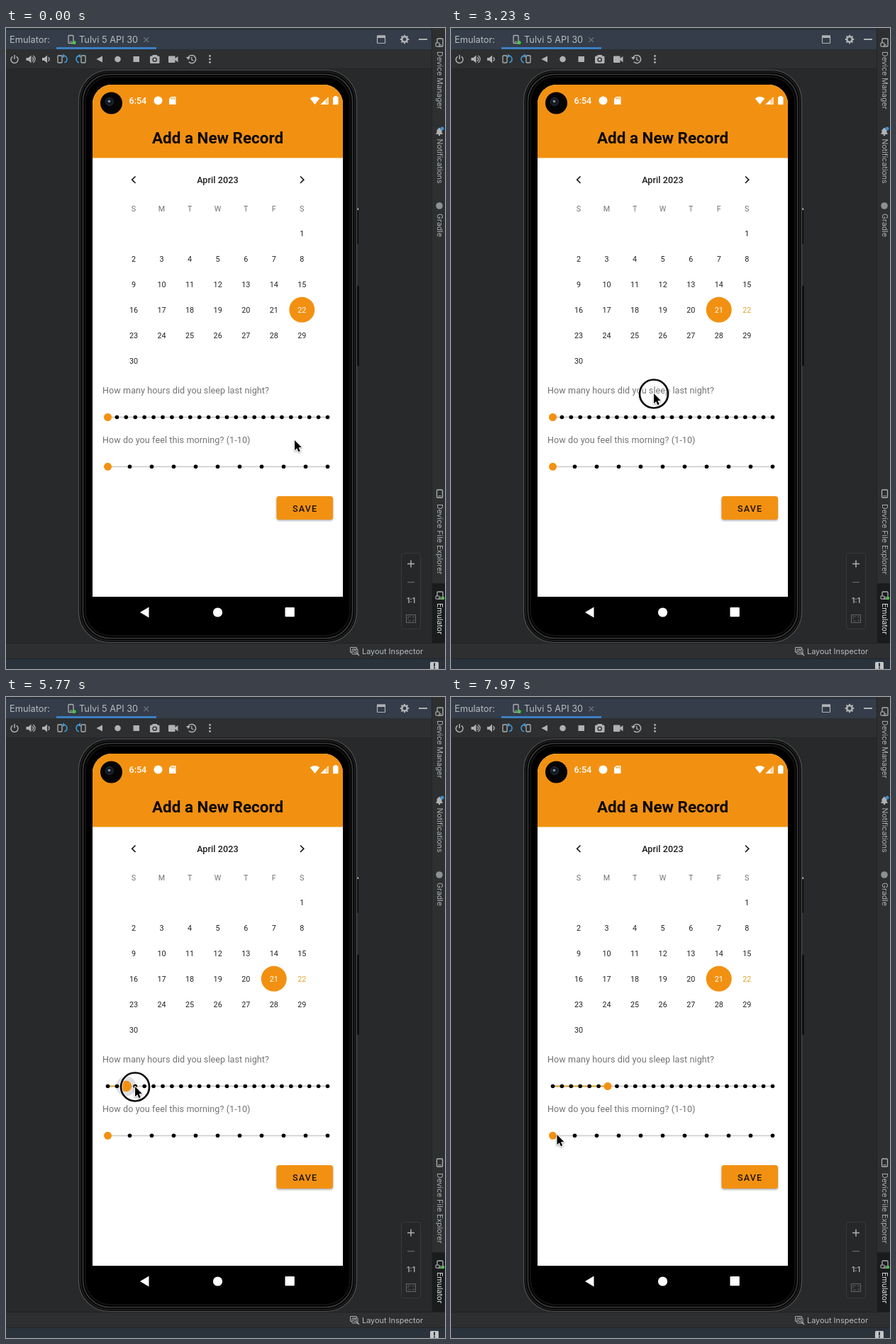
Recreate the animation shown at these times as an HTML page with a canvas. Size 619 by 905 pixels, loop 8000 ms.

```html
<!DOCTYPE html>
<html lang="en">
<head>
<meta charset="utf-8">
<title>Sleep record form</title>
<style>
html, body { margin: 0; width: 100%; height: 100%; overflow: hidden; background: #27292b; }
canvas { display: block; }
</style>
</head>
<body>
<canvas id="stage" width="619" height="905"></canvas>
<script>
const W = 619, H = 905, LOOP = 8000;
const ORANGE = '#f29111', GOLD = '#dba52e', ICON = '#afb1b3';
const UI = 'Inter, "Open Sans", sans-serif', APP = 'Roboto, "Noto Sans", sans-serif';
const screen = document.getElementById('stage').getContext('2d');
let c = screen;

// ---- drawing helpers
function rect(x, y, w, h, fill) { c.fillStyle = fill; c.fillRect(x, y, w, h); }
function round(x, y, w, h, r, fill, stroke, lw = 1) {
  c.beginPath();
  c.roundRect(x, y, w, h, r);
  if (fill) { c.fillStyle = fill; c.fill(); }
  if (stroke) { c.strokeStyle = stroke; c.lineWidth = lw; c.stroke(); }
}
function disc(x, y, r, fill) {
  c.beginPath();
  c.arc(x, y, r, 0, 7);
  c.fillStyle = fill;
  c.fill();
}
function arc(x, y, r, a, b, color, lw = 1.4) {
  c.beginPath();
  c.arc(x, y, r, a, b);
  c.strokeStyle = color;
  c.lineWidth = lw;
  c.stroke();
}
function trace(pts) {
  c.beginPath();
  for (let i = 0; i < pts.length; i += 2) c.lineTo(pts[i], pts[i + 1]);
}
function line(pts, color, lw = 1.4) {
  trace(pts);
  c.strokeStyle = color;
  c.lineWidth = lw;
  c.stroke();
}
function poly(pts, fill) {
  trace(pts);
  c.closePath();
  c.fillStyle = fill;
  c.fill();
}
function text(str, x, y, font, color, align = 'left', spacing = 0) {
  c.font = font;
  c.fillStyle = color;
  c.textAlign = align;
  c.letterSpacing = spacing + 'px';
  c.fillText(str, x, y);
  c.letterSpacing = '0px';
}

// ---- IDE window
function sideLabel(str, y, color = ICON) {
  c.save();
  c.translate(607.5, y);
  c.rotate(Math.PI / 2);
  text(str, 0, 0, '10.6px ' + UI, color);
  c.restore();
}
function deviceIcon(x, y, w, h, dot) {
  round(x, y, w, h, 1, null, ICON, 1.3);
  line([x + 2, y + h - 2.3, x + w - 2, y + h - 2.3], ICON, 1);
  if (dot) disc(x + w + 1, y + h - 1, 2.6, dot);
}
function speaker(x, loud) {
  poly([x - 6, 42, x - 3, 42, x + 1, 38.5, x + 1, 49.5, x - 3, 46, x - 6, 46], ICON);
  arc(x + 1, 44, 3, -1.1, 1.1, ICON, 1.3);
  if (loud) arc(x + 1, 44, 5.6, -1.1, 1.1, ICON, 1.3);
}
function toolbar() {
  arc(12, 44.5, 5, -1, 4.14, ICON, 1.5);
  line([12, 38, 12, 44], ICON, 1.5);
  speaker(34.5, true);
  speaker(57, false);
  round(73, 39, 6, 10, 1, null, ICON, 1.3);
  arc(81, 44, 5, -1.4, 1.3, '#3f9ad6', 1.6);
  poly([80, 36.5, 84, 39.5, 80, 42], '#3f9ad6');
  round(106, 39, 6, 10, 1, null, ICON, 1.3);
  arc(104, 44, 5, 1.8, 4.5, '#3f9ad6', 1.6);
  poly([105, 36.5, 101, 39.5, 105, 42], '#3f9ad6');
  poly([127.5, 44, 136, 39.5, 136, 48.5], ICON);
  disc(157.5, 44, 4.3, ICON);
  rect(179.5, 40, 8.5, 8, ICON);
  round(203, 39.5, 13.5, 10.5, 1.5, ICON);
  rect(206.5, 38, 6.5, 3, ICON);
  arc(209.7, 44.7, 2.6, 0, 7, '#2d2f31', 1.4);
  round(229, 39.5, 9.5, 9.5, 1, ICON);
  poly([237, 44, 242.5, 40, 242.5, 48.5], ICON);
  arc(262, 44, 5.6, -2.8, 2.4, ICON, 1.5);
  poly([254, 41, 260, 41, 257, 45], ICON);
  line([261.8, 41, 261.8, 44.8, 264.6, 46], ICON, 1.3);
  for (const y of [39.5, 44, 48.5]) disc(287.5, y, 1.4, ICON);
}
function sidebar() {
  rect(601, 0, 18, 869, '#2d2f31');
  rect(600, 0, 1, 869, '#222426');
  rect(601, 784, 18, 84, '#191b1c');
  deviceIcon(608, 15, 8, 11);
  round(606, 21, 5, 5, 0.5, '#2d2f31', ICON, 1.1);
  sideLabel('Device Manager', 33);
  poly([606, 150, 607.5, 147.5, 607.5, 144, 611, 140.5, 614.5, 144, 614.5, 147.5, 616, 150], ICON);
  disc(611, 151, 1.3, ICON);
  disc(615, 142, 2.5, '#3e8fd0');
  sideLabel('Notifications', 156.5);
  disc(611, 251, 4.8, '#8d9194');
  sideLabel('Gradle', 262);
  deviceIcon(607.5, 652, 8, 11);
  sideLabel('Device File Explorer', 672);
  deviceIcon(608, 796, 8, 10);
  round(606, 802, 5, 4, 0.5, '#191b1c', ICON, 1.1);
  disc(616, 805, 2.3, '#4fc14a');
  sideLabel('Emulator', 812, '#e2e4e5');
}
function zoomPanel() {
  round(557.5, 741.5, 27, 107, 4, '#252729', '#383a3c');
  line([566, 756.5, 576, 756.5], ICON, 1.5);
  line([571, 751.5, 571, 761.5], ICON, 1.5);
  line([566, 782.5, 576, 782.5], '#626466', 1.3);
  text('1:1', 571, 812, '600 10.5px ' + UI, ICON, 'center');
  c.setLineDash([4, 2]);
  round(567, 831, 8, 6, 0, null, '#55585a');
  c.setLineDash([]);
  round(564.5, 828.5, 13, 11, 0, null, '#626466', 1.1);
}
function ide() {
  rect(0, 0, W, H, '#27292b');
  rect(0, 0, 601, 31, '#343d49');
  rect(0, 0, 601, 3, '#2c333d');
  rect(0, 30, 601, 28, '#2d2f31');
  rect(0, 57, 601, 1, '#232527');
  text('Emulator:', 5, 21, '12.8px ' + UI, '#b9bcbf');
  deviceIcon(88, 10.5, 7, 11, '#4fc14a');
  text('Tulvi 5 API 30', 103, 21, '12.8px ' + UI, '#b9bcbf');
  line([194.5, 13.5, 201, 20], '#69717b', 1.2);
  line([201, 13.5, 194.5, 20], '#69717b', 1.2);
  rect(71, 27, 141, 3, '#3c7fc4');
  round(523.5, 11, 11, 10.5, 0.5, null, ICON, 1.2);
  rect(523, 10.5, 12, 3.5, ICON);
  arc(562, 16, 3.7, 0, 7, ICON, 2.6);
  for (let i = 0; i < 8; i++) {
    const a = i * Math.PI / 4, x = Math.cos(a), y = Math.sin(a);
    line([562 + x * 4, 16 + y * 4, 562 + x * 6.3, 16 + y * 6.3], ICON, 2);
  }
  rect(582, 15, 12, 2, ICON);
  toolbar();
  zoomPanel();
  sidebar();
  rect(0, 869, W, 36, '#2d2f31');
  rect(0, 868, W, 1, '#202224');
  rect(0, 891, W, 14, '#2a323c');
  rect(0, 890, W, 1, '#222426');
  round(485.5, 874.5, 9, 7, 0.5, null, ICON, 1);
  round(488, 877, 8, 7, 0.5, '#2d2f31', ICON, 1);
  arc(492, 880, 2, 0, 7, ICON, 1);
  line([494, 882, 498, 886], ICON, 1.3);
  text('Layout Inspector', 502, 884, '10.9px ' + UI, '#b9bcbf');
  round(598, 895, 12, 12, 1.5, '#c3c5c7');
  rect(603, 896.5, 2, 5, '#2a323c');
  rect(603, 902.5, 2, 2, '#2a323c');
}

// ---- phone
function phoneBody() {
  round(493, 255, 4, 50, 1, '#0b0b0b');
  round(493, 364, 4.5, 113, 1, '#050505');
  rect(495.5, 254.5, 1.5, 2.5, '#d8d8d8');
  round(102.5, 59.5, 392, 808, 43, '#050505', '#555453', 1.2);
  round(105, 62, 387, 803, 41, null, '#1d1d1d', 2);
  round(108.5, 65.5, 380, 796, 38, '#000', '#3b3b3c', 1.6);
  round(112, 69, 373, 789, 35, '#000', '#111', 2);
}
function statusBar() {
  disc(148.5, 106, 15.5, '#050505');
  disc(146, 104, 5.5, '#141a24');
  arc(146, 104, 5.5, 0, 7, '#2a2f3a', 1);
  disc(145.5, 103.5, 1.8, '#8291a8');
  text('6:54', 173.5, 107, '500 12.57px ' + APP, '#fff');
  disc(214.5, 102.5, 6, '#fff');
  poly([233, 97, 239.5, 97, 239.5, 108, 230, 108, 230, 100], '#fff');
  for (const x of [233, 235, 237]) rect(x, 98.3, 1, 2.4, ORANGE);
  c.beginPath();
  c.moveTo(435.5, 108);
  c.lineTo(428.7, 99.4);
  c.quadraticCurveTo(435.5, 94.6, 442.3, 99.4);
  c.fillStyle = '#fff';
  c.fill();
  poly([454.5, 97, 454.5, 108, 443.5, 108], '#f9cf97');
  poly([450.5, 101, 450.5, 108, 443.5, 108], '#fff');
  line([454, 98, 454, 107.5, 444.7, 107.5], '#fff', 1);
  round(461, 97.3, 7.5, 10.9, 1, '#fff');
  rect(463, 96, 3.5, 2, '#fff');
}
function phone() {
  phoneBody();
  c.save();
  c.beginPath();
  c.roundRect(122, 80, 353, 770, [27, 27, 20, 20]);
  c.clip();
  rect(122, 80, 353, 723, '#fff');
  rect(122, 80, 353, 103.5, ORANGE);
  c.restore();
  statusBar();
  text('Add a New Record', 298.5, 163, 'bold 22.45px ' + APP, '#0c0903', 'center');
  line([182.5, 209.5, 177.7, 214.2, 182.5, 219], '#1c1c1c', 1.7);
  line([415, 209.5, 419.8, 214.2, 415, 219], '#1c1c1c', 1.7);
  text('April 2023', 298.5, 219, '500 12.57px ' + APP, '#1f1f1f', 'center', 0.09);
  [...'SMTWTFS'].forEach((d, i) => text(d, dayX(i), 259, '10.78px ' + APP, '#717171', 'center'));
  text('How many hours did you sleep last night?', 136, 516, '12.57px ' + APP, '#737373', 'left', 0.09);
  text('How do you feel this morning? (1-10)', 136, 585.5, '12.57px ' + APP, '#737373', 'left', 0.09);
  c.shadowColor = 'rgba(0,0,0,.35)';
  c.shadowBlur = 3;
  c.shadowOffsetY = 1.5;
  round(381.5, 661, 79.5, 33, 3.6, ORANGE);
  c.shadowColor = 'transparent';
  c.shadowBlur = c.shadowOffsetY = 0;
  text('SAVE', 404, 682.5, '500 12.57px ' + APP, '#1d1405', 'left', 1.12);
  poly([189, 825, 201.5, 817.5, 201.5, 832.5], '#fff');
  disc(298.5, 825, 6.6, '#fff');
  round(393.5, 818, 13.3, 13.3, 1, '#fff');
}

// ---- changing parts
const dayX = i => 180 + 39.55 * i;
function calendar(picked) {
  for (let d = 1; d <= 30; d++) {
    const x = dayX((d + 5) % 7), y = 290 + 36 * Math.floor((d + 5) / 7);
    if (d === picked) disc(x, y - 0.2, 18, ORANGE);
    const color = d === picked ? '#fff' : d === 22 ? GOLD : '#222';
    text(d, x, y + 3.8, '10.78px ' + APP, color, 'center');
  }
}
const X0 = 143.5, SPAN = 310;
function slider(y, steps, value, press) {
  const at = k => X0 + SPAN * k / steps, x = at(value);
  line([X0, y, X0 + SPAN, y], '#d0d0d0', 1.8);
  if (value) line([X0, y, x, y], GOLD, 1.8);
  if (press) disc(x, y, 14 * press, `rgba(120,115,130,${0.24 * press})`);
  for (let k = 0; k <= steps; k++) disc(at(k), y, 2.8, '#000');
  disc(x, y, 5.5 + 2.2 * press, ORANGE);
}
function ring(x, y) {
  arc(x, y, 20, 0, 7, 'rgba(255,255,255,.65)', 5);
  arc(x, y, 20, 0, 7, '#0a0a0a', 2.7);
}
function pointer(x, y) {
  c.save();
  c.translate(x, y);
  trace([0, 0, 0, 14.2, 3.2, 11.2, 5.4, 16.3, 7.7, 15.3, 5.5, 10.3, 9.8, 10.1]);
  c.closePath();
  c.shadowColor = 'rgba(0,0,0,.4)';
  c.shadowBlur = 2.5;
  c.shadowOffsetY = 1;
  c.lineJoin = 'round';
  c.strokeStyle = '#fff';
  c.lineWidth = 2;
  c.stroke();
  c.shadowColor = 'transparent';
  c.fillStyle = '#000';
  c.fill();
  c.restore();
}

// ---- timeline: [ms, x, y], eased between stops
const PATH = [
  [0, 407, 582], [120, 407, 581], [1130, 404, 404], [1650, 378, 400], [2300, 378, 400],
  [3180, 286, 516], [3400, 286, 516], [4600, 150, 549], [5080, 150, 549]
];
const DRAG = [[5080, 150, 549], [5770, 182, 550], [6470, 215, 552], [6620, 224, 553]];
const LEAVE = [[6990, 224, 553], [7800, 149, 615], [7950, 149.5, 618], [LOOP, 149.5, 618]];
const clamp = v => Math.min(1, Math.max(0, v));
const smooth = v => v * v * (3 - 2 * v);
function along(stops, t, ease) {
  let i = 1;
  while (i < stops.length - 1 && t > stops[i][0]) i++;
  const [t0, x0, y0] = stops[i - 1], [t1, x1, y1] = stops[i];
  const k = ease(clamp((t - t0) / (t1 - t0)));
  return [x0 + (x1 - x0) * k, y0 + (y1 - y0) * k];
}
function pointerAt(t) {
  if (t < 5080) return along(PATH, t, smooth);
  return t < 6990 ? along(DRAG, t, k => k) : along(LEAVE, t, smooth);
}
const CLICKS = [[1900, 2040], [3180, 3300], [4920, 6640]];

const base = document.createElement('canvas');
base.width = W;
base.height = H;
c = base.getContext('2d');
ide();
phone();
c = screen;

function draw(t) {
  const [x, y] = pointerAt(t);
  const hours = t < 5080 ? 0 : t < 6620 ? Math.max(0, Math.round((x - 150) / (SPAN / 24))) : 6;
  const press = smooth(clamp((t - 5120) / 150)) * (1 - smooth(clamp((t - 6650) / 190)));
  c.drawImage(base, 0, 0);
  calendar(t < 2030 ? 22 : 21);
  slider(549.5, 24, hours, press);
  slider(619.3, 10, 0, 0);
  if (CLICKS.some(([a, b]) => t >= a && t < b)) ring(x, y + 0.5);
  pointer(x, y);
}
const start = performance.now();
function tick() {
  draw((performance.now() - start) % LOOP);
  requestAnimationFrame(tick);
}
tick();
</script>
</body>
</html>
```
